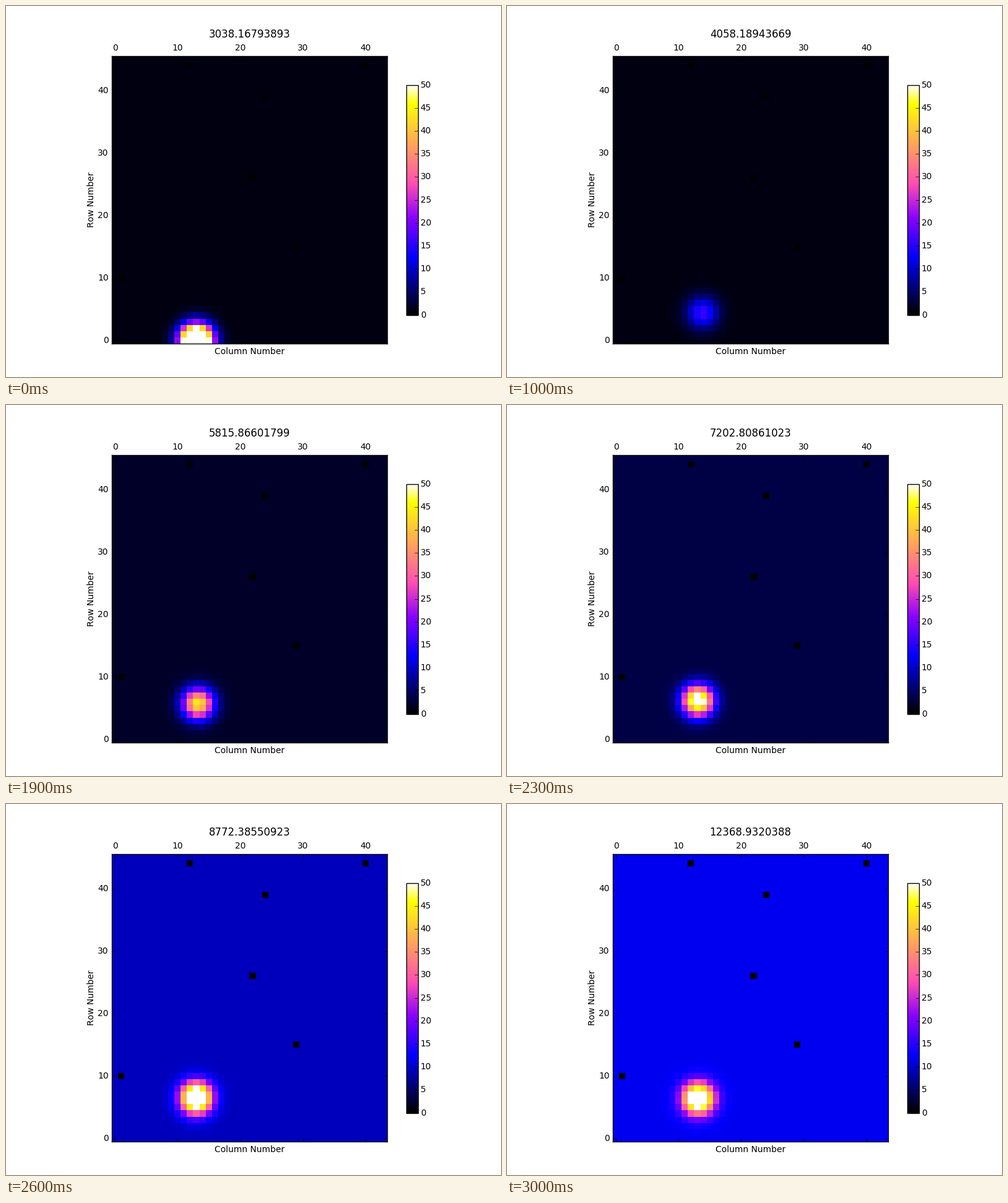
These frames come from a looping animation (800 px wide and 600 px high, 3100 ms). A matplotlib script:

```python
import matplotlib.pyplot as plt
import numpy as np
from matplotlib.animation import FuncAnimation

W, H, DPI = 800, 600, 100
FRAMES, INTERVAL = 31, 100
ROWS, COLS = 46, 44

plt.rcParams.update({
    "font.family": "DejaVu Sans", "font.size": 10, "text.kerning_factor": 6,
    "axes.linewidth": 1.0, "savefig.dpi": DPI, "ytick.alignment": "center",
})

# Key frames of the scan and the state of the beam at each of them
KEYS = [0, 4, 10, 14, 23, 26, 30]
WAVELENGTH = np.array([3038.16793893, 3377.75384543, 4058.18943669,
                       4687.80715069, 7202.80861023, 8772.38550923,
                       12368.9320388])
BACKGROUND = [0.83, 1.27, 0.9, 1.08, 3.33, 9.2, 11.88]
PEAK = [95, 0, 15.5, 29.3, 53, 60, 54]
SPOT_X = [13, 13.9, 13.85, 13.5, 13.1, 13, 13.16]
SPOT_Y = [0, 3.0, 4.45, 5.13, 6.2, 6.5, 6.38]
SPOT_VAR = 3.0
DEAD = [(12, 44), (40, 44), (24, 39), (22, 26), (29, 15), (1, 10)]
HIT_FRAME, HIT_COL, HIT_ROW, HIT_VALUE = 4, 14, 5, 45

rows, cols = np.mgrid[:ROWS, :COLS]


def wavelength(n):
    """The scan is smooth in energy, so interpolate the reciprocal."""
    total = 0.0
    for i, a in enumerate(KEYS):
        weight = 1.0
        for b in KEYS[:i] + KEYS[i + 1:]:
            weight *= (n - b) / (a - b)
        total += weight / WAVELENGTH[i]
    return 1 / total


def at(n, values):
    return np.interp(n, KEYS, values)


def detector(n):
    r2 = (cols - at(n, SPOT_X)) ** 2 + (rows - at(n, SPOT_Y)) ** 2
    level = np.exp(at(n, np.log(BACKGROUND)))
    data = level + at(n, PEAK) * np.exp(-r2 / (2 * SPOT_VAR))
    if n == HIT_FRAME:
        data[HIT_ROW, HIT_COL] = HIT_VALUE
    for c, r in DEAD:
        data[r, c] = 0
    return data


def pixel_axes(left, top, width, height):
    return fig.add_axes([left / W, 1 - (top + height) / H,
                         width / W, height / H])


fig = plt.figure(figsize=(W / DPI, H / DPI), dpi=DPI, facecolor="white")

width = 465 * COLS / ROWS
ax = pixel_axes(616 - width, 81, width, 465)
image = ax.imshow(detector(0), cmap="gnuplot2", vmin=0, vmax=50,
                  origin="lower", interpolation="nearest", aspect="auto")
ax.set_xticks(range(0, 50, 10))
ax.set_yticks(range(0, 50, 10))
ax.set_xlim(-0.5, COLS - 0.5)
ax.set_ylim(-0.5, ROWS - 0.5)
ax.tick_params(direction="in", length=4, width=0.5, pad=4,
               top=True, bottom=True, left=True, right=True,
               labeltop=True, labelbottom=False)
title = ax.set_title("", fontsize=12, y=1.05, pad=5)

fig.text((616 - width / 2) / W, 1 - 563.4 / H, "Column Number",
         ha="center", va="baseline")
fig.text(141.5 / W, 1 - 313.5 / H, "Row Number", rotation=90,
         rotation_mode="anchor", ha="center", va="baseline")

cax = pixel_axes(647, 127.5, 18.6, 372)
bar = fig.colorbar(image, cax=cax, ticks=range(0, 51, 5))
bar.outline.set_linewidth(1.0)
cax.tick_params(direction="in", length=4, width=0.5, pad=3)


def update(n):
    image.set_data(detector(n))
    title.set_text(f"{wavelength(n):.12g}")
    return image, title


anim = FuncAnimation(fig, update, frames=FRAMES, interval=INTERVAL,
                     repeat=True, repeat_delay=0, blit=False)
plt.show()
```
